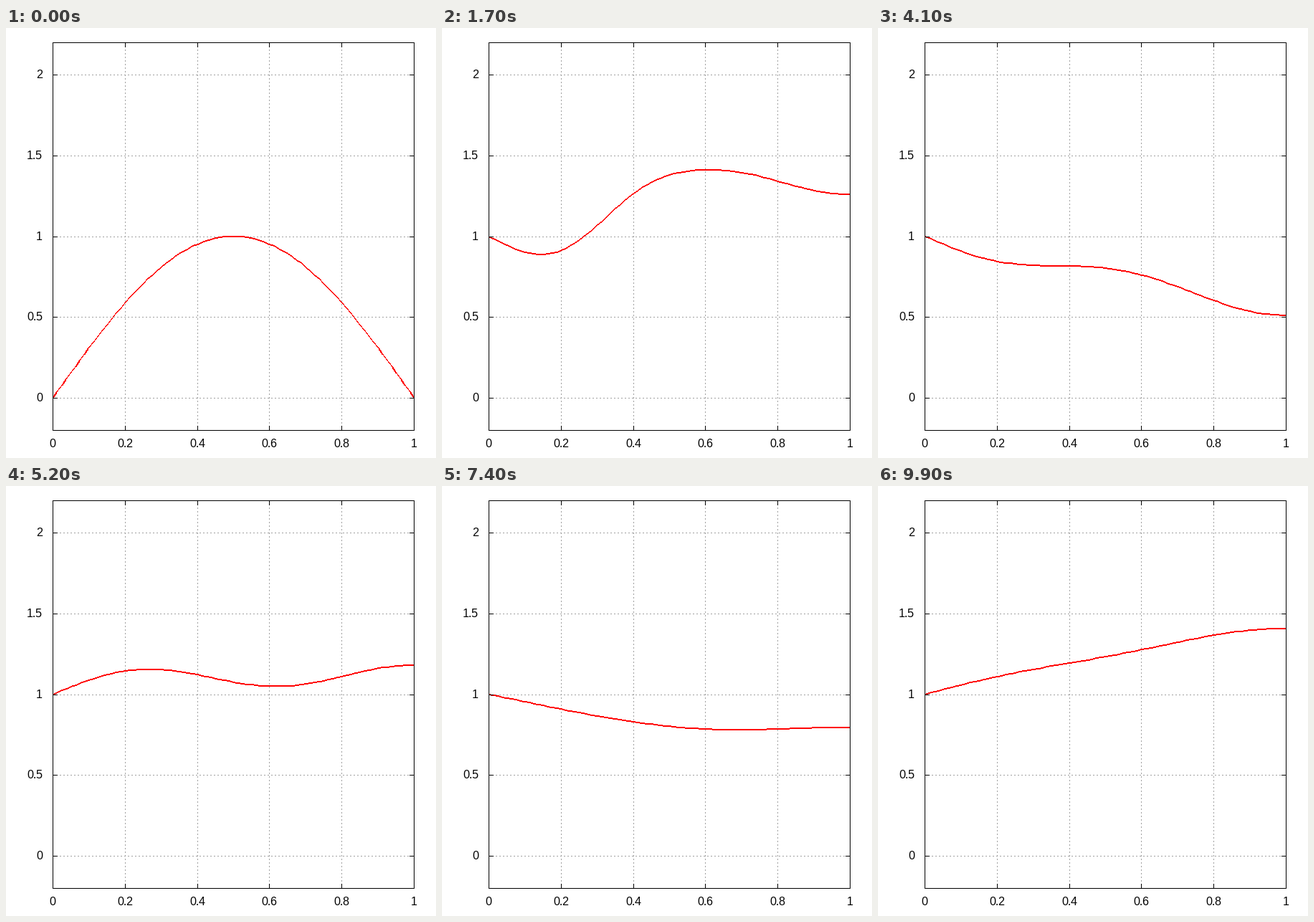
A matplotlib script for the animation above (10 s loop, 600x600 px).

```python
import numpy as np
import matplotlib
import matplotlib.pyplot as plt
from matplotlib.animation import FuncAnimation

matplotlib.rcParams["font.family"] = "Liberation Sans"
matplotlib.rcParams["text.hinting"] = "native"
matplotlib.rcParams["text.hinting_factor"] = 1

SIZE, DPI = 600, 100
PX = 72 / DPI                       # one pixel in points
LEFT, RIGHT, TOP, BOTTOM = 65, 569, 20, 561
Y_MIN, Y_MAX = -0.2, 2.2
FRAMES, INTERVAL = 100, 100
CELLS, DT, STEPS = 80, 0.01, 10


def nearest(v):
    return np.floor(np.asarray(v) + 0.5)


def to_x(v):
    return nearest(LEFT + np.asarray(v) * (RIGHT - LEFT))


def to_y(v):
    scale = (BOTTOM - TOP) / (Y_MAX - Y_MIN)
    return nearest(BOTTOM - (np.asarray(v) - Y_MIN) * scale)


def solve_wave():
    """Implicit wave equation: u = 1 at the left end, free right end."""
    x = np.linspace(0, 1, CELLS + 1)
    r = (DT * CELLS) ** 2
    m = CELLS - 1
    a = (1 + 2 * r) * np.eye(m) - r * (np.eye(m, k=1) + np.eye(m, k=-1))
    a[-1, -1] = 1 + r
    inv = np.linalg.inv(a)
    edge = np.zeros(m)
    edge[0] = r

    start = np.sin(np.pi * x)
    states = [start]
    old = now = start[1:-1]
    for _ in range(FRAMES - 1):
        for _ in range(STEPS):
            old, now = now, inv @ (2 * now - old + edge)
        states.append(np.concatenate(([1.0], now, now[-1:])))
    return x, states


fig = plt.figure(figsize=(SIZE / DPI, SIZE / DPI), dpi=DPI, facecolor="white")
ax = fig.add_axes([0, 0, 1, 1])


def rule(x0, y0, x1, y1, **style):
    """One-pixel line through pixel centres."""
    ax.plot([x0 + 0.5, x1 + 0.5], [y0 + 0.5, y1 + 0.5], lw=PX, snap=False,
            **style)


def label(x, y, v, ha):
    ax.text(x, y, f"{v:g}", size=16 * PX, ha=ha, va="baseline")


grid = dict(color="#a0a0a0", ls=(0.5, (2, 3)), dash_capstyle="butt", zorder=1)
solid = dict(color="black", solid_capstyle="projecting", zorder=3)
TICK = 6

for v in (0, 0.2, 0.4, 0.6, 0.8, 1):
    p = to_x(v)
    if 0 < v < 1:
        rule(p, BOTTOM, p, TOP, **grid)
        rule(p, BOTTOM, p, BOTTOM - TICK, **solid)
        rule(p, TOP, p, TOP + TICK, **solid)
    label(p, 585, v, "center")

for v in (0, 0.5, 1, 1.5, 2):
    p = to_y(v)
    rule(LEFT, p, RIGHT, p, **grid)
    rule(LEFT, p, LEFT + TICK, p, **solid)
    rule(RIGHT, p, RIGHT - TICK, p, **solid)
    label(51, p + 5, v, "right")

for y in (TOP, BOTTOM):
    rule(LEFT, y, RIGHT, y, **solid)
for x in (LEFT, RIGHT):
    rule(x, TOP, x, BOTTOM, **solid)

xs, states = solve_wave()
cols = np.arange(LEFT, RIGHT + 1)


def band(u):
    """Upper and lower pixel edge of the stroke in each column."""
    y = np.interp(cols, to_x(xs), to_y(u))
    half = nearest(np.maximum(1, np.abs(np.gradient(y))))
    y = nearest(y)
    return y - half, y + half


upper, lower = band(states[0])
curve = ax.stairs(lower, np.append(cols, RIGHT + 1), baseline=upper,
                  fill=True, color="red", lw=0, snap=False, zorder=2)

ax.set_xlim(0, SIZE)
ax.set_ylim(SIZE, 0)
ax.axis("off")


def update(i):
    upper, lower = band(states[i])
    curve.set_data(values=lower, baseline=upper)
    return curve,


anim = FuncAnimation(fig, update, frames=FRAMES, interval=INTERVAL,
                     repeat=True, repeat_delay=0)
plt.show()
```
